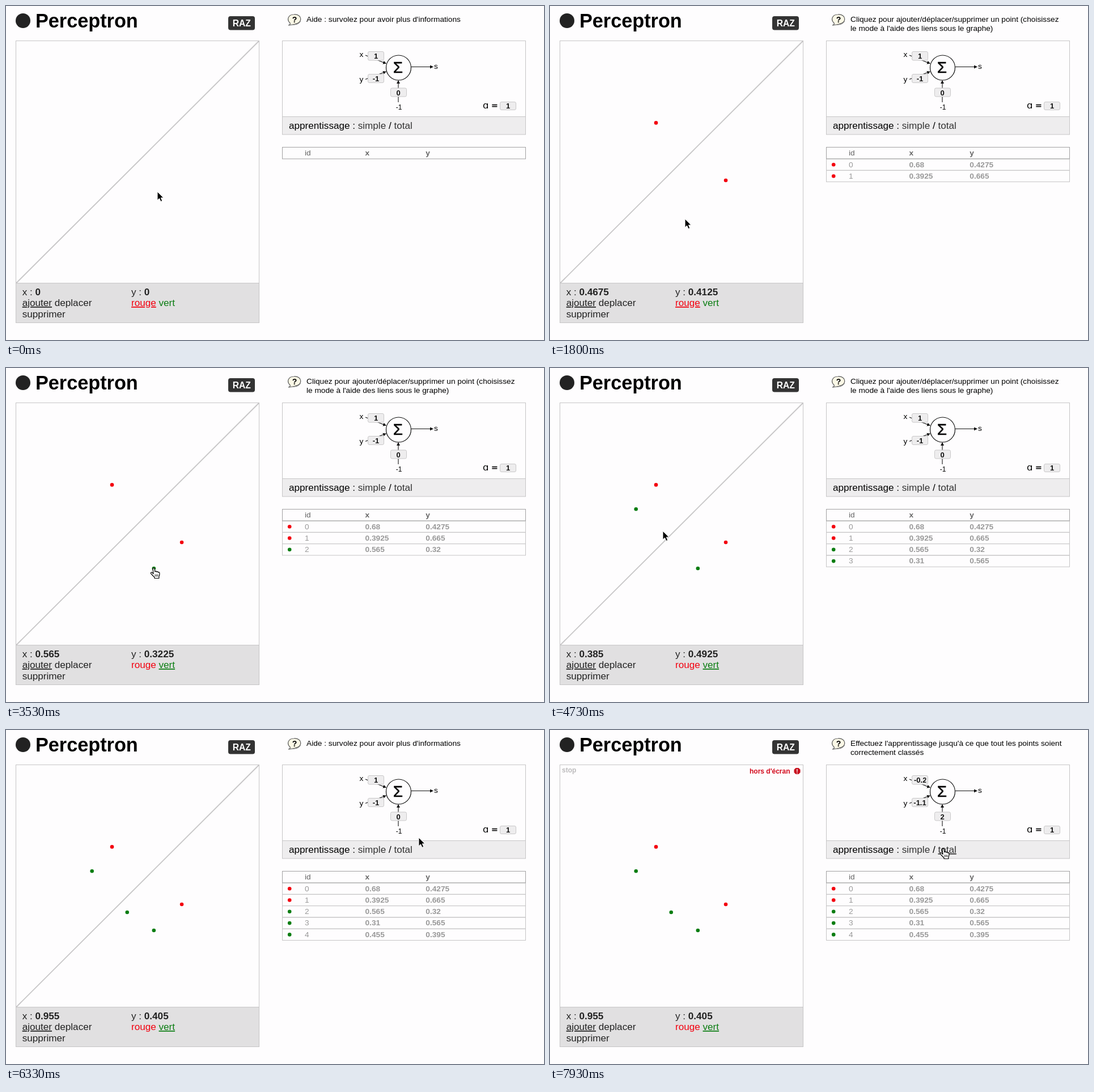
Recreate the animation shown at these times as an HTML page. Size 949 by 590 pixels, loop 8 s.

```html
<!DOCTYPE html>
<html lang="fr">
<head>
<meta charset="utf-8">
<title>Perceptron</title>
<style>
  html, body { margin: 0; width: 100%; height: 100%; overflow: hidden; background: #fefdfe; }
  svg { display: block; width: 949px; height: 590px; }
  text { font: 17.12px "Liberation Sans", Arial, sans-serif; fill: #222; white-space: pre; }
  .small { font-size: 13.7px; }
  .black { fill: #000; }
  .bold { font-weight: bold; }
  .on { text-decoration: underline; }
  .red { fill: #f3000f; }
  .green { fill: #0a7d12; }
  .mid { text-anchor: middle; }
  .frame { fill: none; stroke: #c6c5c6; }
  .input { fill: #eeedee; stroke: #c9c8c9; }
  .value { font-size: 13px; font-weight: bold; fill: #111; }
  .wire { stroke: #111; stroke-width: 1.1; fill: none; marker-end: url(#arrow); }
  .cell { font-size: 13.7px; fill: #999; }
  .head { font-size: 13.7px; fill: #666; }
  .tiny { font-size: 12px; font-weight: bold; }
</style>
</head>
<body>
<svg viewBox="0 0 949 590">
  <defs>
    <marker id="arrow" markerUnits="userSpaceOnUse" markerWidth="7" markerHeight="7" refX="5" refY="3" orient="auto">
      <path d="M0 0L6 3L0 6Z" fill="#111"/>
    </marker>
    <clipPath id="clipX"><rect x="641" y="80" width="22.5" height="16"/></clipPath>
    <clipPath id="clipY"><rect x="641" y="120" width="24" height="16"/></clipPath>
  </defs>

  <circle cx="30" cy="26" r="13" fill="#222"/>
  <text class="bold" x="52" y="38" style="font-size:34.24px;fill:#000">Perceptron</text>
  <rect x="392" y="18" width="47" height="24.5" rx="4" fill="#333"/>
  <text class="bold mid" x="415.7" y="35.5" style="font-size:15.6px;fill:#fff">RAZ</text>

  <path d="M501 30C495 25 497 15 508 15C523 14 524 31 509 32Q504 34 498 34Q502 33 501 30Z" fill="#fbf8e6" stroke="#555" stroke-width="1.2"/>
  <path d="M502 33Q515 35 520 27" fill="none" stroke="#999"/>
  <text class="bold mid black" x="509" y="29" style="font-size:14px">?</text>
  <text class="small black" id="help1" x="530" y="28"></text>
  <text class="small black" id="help2" x="530" y="44"></text>

  <rect class="frame" x="17.5" y="61.5" width="429" height="428"/>
  <path id="divider" d="M18 489.5L446 62" stroke="#c8c7c8" stroke-width="1.9"/>
  <g id="running">
    <text class="tiny" x="21" y="75" style="fill:#bcbbbc">stop</text>
    <text class="tiny" x="352" y="77" style="fill:#d3091c">hors d'écran</text>
    <path d="M433.5 67H438.5L441.5 70V75L438.5 78H433.5L430.5 75V70Z" fill="#c8101f"/>
    <text class="bold mid" x="436" y="76.5" style="font-size:10px;fill:#fff">!</text>
  </g>
  <rect x="17.5" y="489.5" width="429" height="70" fill="#e1e0e1" stroke="#c6c5c6"/>
  <text x="28.7" y="511">x : <tspan class="bold" id="readX"></tspan></text>
  <text x="221" y="511">y : <tspan class="bold" id="readY"></tspan></text>
  <text x="28.7" y="530"><tspan class="on">ajouter</tspan> deplacer</text>
  <text x="28.7" y="549.5">supprimer</text>
  <text x="221" y="530"><tspan class="red" id="rouge">rouge</tspan> <tspan class="green" id="vert">vert</tspan></text>

  <rect x="487.5" y="195.5" width="429" height="31.5" fill="#eeedee"/>
  <rect class="frame" x="487.5" y="61.5" width="429" height="165.5"/>
  <path class="frame" d="M488 195.5H916"/>
  <text class="black" x="499" y="217">apprentissage : <tspan fill="#333">simple</tspan> / <tspan fill="#333" id="total">total</tspan></text>

  <path class="wire" d="M634 87L670 101.5"/>
  <path class="wire" d="M634 129.5L670 116"/>
  <path class="wire" d="M692 170V132"/>
  <path class="wire" d="M715 107.5H753"/>
  <circle cx="692.5" cy="109" r="22" fill="#fefdfe" stroke="#111" stroke-width="1.2"/>
  <text class="mid black" x="691.5" y="118" style="font-size:28px;stroke:#000;stroke-width:.5">Σ</text>
  <text class="small black mid" x="627" y="90">x</text>
  <text class="small black mid" x="627" y="133.5">y</text>
  <text class="small black mid" x="758.5" y="111">s</text>
  <text class="black mid" x="693" y="183" style="font-size:12px">-1</text>
  <rect class="input" x="638.5" y="80.5" width="28" height="15.5" rx="2.5"/>
  <rect class="input" x="638.5" y="120.5" width="28" height="15" rx="2.5"/>
  <rect class="input" x="678.5" y="145" width="28" height="15" rx="2.5"/>
  <rect class="input" x="871.5" y="169.5" width="28" height="14" rx="2.5"/>
  <g clip-path="url(#clipX)"><text class="value" id="weightX" y="93"></text></g>
  <g clip-path="url(#clipY)"><text class="value" id="weightY" y="133"></text></g>
  <text class="value mid" id="bias" x="692" y="157.5"></text>
  <text class="value mid" x="885.5" y="181">1</text>
  <text class="black" x="841" y="181" style="font-family:'DejaVu Sans',sans-serif;font-size:16.5px">ɑ</text>
  <text class="black" x="856" y="181" style="font-family:'DejaVu Sans',sans-serif;font-size:14px;stroke:#000;stroke-width:.3">=</text>

  <g id="rows"></g>
  <rect x="487.5" y="249.5" width="429" height="20.5" fill="none" stroke="#a2a1a2"/>
  <text class="head" x="527" y="264.3">id</text>
  <text class="head bold" x="633.5" y="264.3">x</text>
  <text class="head bold" x="740.3" y="264.3">y</text>

  <g id="dots"></g>
  <g id="cursor">
    <path id="pointer" d="M0 0V15.2L3.5 11.9L6 17.5L8.7 16.3L6.3 10.9H11Z" fill="#000" stroke="#fff" stroke-width="1" stroke-linejoin="round"/>
    <g id="hand" fill="#fff" stroke="#000" stroke-width="1.2" stroke-linejoin="round">
      <path d="M-2 1.2C-2 -.6 .8 -.6 1 1.2L1.8 6.5C2.2 5 4.6 5 4.9 6.8C5.4 5.6 7.3 5.8 7.5 7.6C8.4 6.8 9.8 7.4 9.9 8.8C10.2 12 9.5 13.5 8.8 15V18H1V16.3C-1 14.5 -3.2 12 -5.2 9.8C-6.5 8 -4.5 6.6 -3 8L-1 10Z"/>
      <path d="M2.1 11V15M4.4 11V15M6.7 11V15" fill="none" stroke-width=".9"/>
    </g>
  </g>
</svg>
<script>
const $ = id => document.getElementById(id);
const LOOP = 8000, STEP = 1000 / 15;
const PICK_GREEN = 32, TRAIN = 112;
const HELP = {
  idle: ["Aide : survolez pour avoir plus d'informations", ""],
  plot: ["Cliquez pour ajouter/déplacer/supprimer un point (choisissez", "le mode à l'aide des liens sous le graphe)"],
  total: ["Effectuez l'apprentissage jusqu'à ce que tout les points soient", "correctement classés"]
};

// d: desired output, at: step when the point is clicked
const points = [
  { x: .68, y: .4275, d: 1, at: 8 },
  { x: .3925, y: .665, d: 1, at: 21 },
  { x: .565, y: .32, d: -1, at: 47 },
  { x: .31, y: .565, d: -1, at: 62 },
  { x: .455, y: .395, d: -1, at: 77 }
];

// Pointer path: [step, x, y]
const path = [
  [0, 267, 328], [1, 267, 328], [7, 310, 308], [10, 310, 308], [14, 233, 258], [15, 230, 247],
  [19, 187, 206], [23, 187, 206], [30, 284, 526], [36, 290, 524], [38, 292, 492], [39, 286, 442],
  [45, 261, 353.5], [54, 261, 353.5], [60, 152, 249], [64, 152, 249], [70, 184, 280], [71, 199, 288],
  [75, 214, 322], [79, 214, 322], [84, 428, 318], [85, 470, 300], [94, 728, 190], [96, 728, 190],
  [103, 694, 209.5], [120, 694, 209.5]
];

const toScreen = p => [19 + 428 * p.x, 491 - 428 * p.y];
const inside = ([x, y], l, t, r, b) => x >= l && x <= r && y >= t && y <= b;
const inPlot = p => inside(p, 18, 62, 447, 493);
const snap = v => String(Math.round(v * 400) / 400);

function slope(i, axis) {
  const a = path[i - 1], b = path[i], c = path[i + 1];
  if (!a || !c) return 0;
  if (a[axis] === b[axis] || b[axis] === c[axis]) return 0;
  return (c[axis] - a[axis]) / (c[0] - a[0]);
}

function pointerAt(step) {
  let i = 0;
  while (i < path.length - 2 && path[i + 1][0] <= step) i++;
  const a = path[i], b = path[i + 1], span = b[0] - a[0], u = (step - a[0]) / span;
  return [1, 2].map(k => {
    const ease = u * u * (3 - 2 * u);
    return a[k] + (b[k] - a[k]) * ease
      + span * (slope(i, k) * u * (1 - u) ** 2 - slope(i + 1, k) * u * u * (1 - u));
  });
}

// One batch pass of the perceptron rule
function train([wx, wy, bias]) {
  const next = [wx, wy, bias];
  for (const { x, y, d } of points) {
    const error = d - (wx * x + wy * y - bias > 0 ? 1 : -1);
    next[0] += error * x;
    next[1] += error * y;
    next[2] -= error;
  }
  return next.map(v => +v.toFixed(4));
}
const before = [1, -1, 0], after = train(before);

function setWeight(id, value) {
  const text = String(value), fits = text.length < 5;
  $(id).textContent = text;
  $(id).setAttribute("x", fits ? 652.5 : 642);
  $(id).style.textAnchor = fits ? "middle" : "start";
}

points.forEach((p, i) => {
  const [cx, cy] = toScreen(p), color = p.d > 0 ? "red" : "green", top = 270 + 20.3 * i;
  $("dots").innerHTML += `<circle class="${color}" cx="${cx}" cy="${cy}" r="3.3"/>`;
  $("rows").innerHTML += `<g><rect class="frame" x="487.5" y="${top}" width="429" height="20.3"/>
    <circle class="${color}" cx="500.2" cy="${top + 10.2}" r="3.3"/>
    <text class="cell" x="527" y="${top + 14.5}">${i}</text>
    <text class="cell bold" x="633.5" y="${top + 14.5}">${p.x}</text>
    <text class="cell bold" x="740.3" y="${top + 14.5}">${p.y}</text></g>`;
});

const show = (node, on) => { node.style.display = on ? "" : "none"; };
let drawn = -1;

function draw(step) {
  const pos = pointerAt(step);
  const overTotal = inside(pos, 684, 202, 717, 221);
  const overColor = inside(pos, 221, 515, 299, 534);
  const overPoint = points.some(p => {
    const [x, y] = toScreen(p);
    return step >= p.at && Math.hypot(pos[0] - x, pos[1] - y) < 5;
  });
  const hand = overTotal || overColor || overPoint;
  $("cursor").setAttribute("transform", `translate(${pos})`);
  show($("hand"), hand);
  show($("pointer"), !hand);

  // The readout trails the pointer by one step and keeps its last value outside the plot
  let k = step - 1;
  while (k > 0 && !inPlot(pointerAt(k))) k--;
  const [rx, ry] = pointerAt(Math.max(k, 0));
  $("readX").textContent = step ? snap((rx - 19) / 428) : "0";
  $("readY").textContent = step ? snap((491 - ry) / 428) : "0";

  const help = HELP[overTotal ? "total" : step && inPlot(pos) ? "plot" : "idle"];
  $("help1").textContent = help[0];
  $("help2").textContent = help[1];
  $("total").classList.toggle("on", overTotal);
  $("rouge").classList.toggle("on", step < PICK_GREEN);
  $("vert").classList.toggle("on", step >= PICK_GREEN);

  points.forEach((p, i) => {
    show($("dots").children[i], step >= p.at);
    show($("rows").children[i], step >= p.at);
  });

  const trained = step >= TRAIN, [wx, wy, bias] = trained ? after : before;
  setWeight("weightX", wx);
  setWeight("weightY", wy);
  $("bias").textContent = bias;
  show($("running"), trained);
  show($("divider"), !trained);
}

function tick() {
  const step = Math.floor(((performance.now() % LOOP) + 5) / STEP) % 120;
  if (step !== drawn) draw(drawn = step);
  requestAnimationFrame(tick);
}
tick();
</script>
</body>
</html>
```
